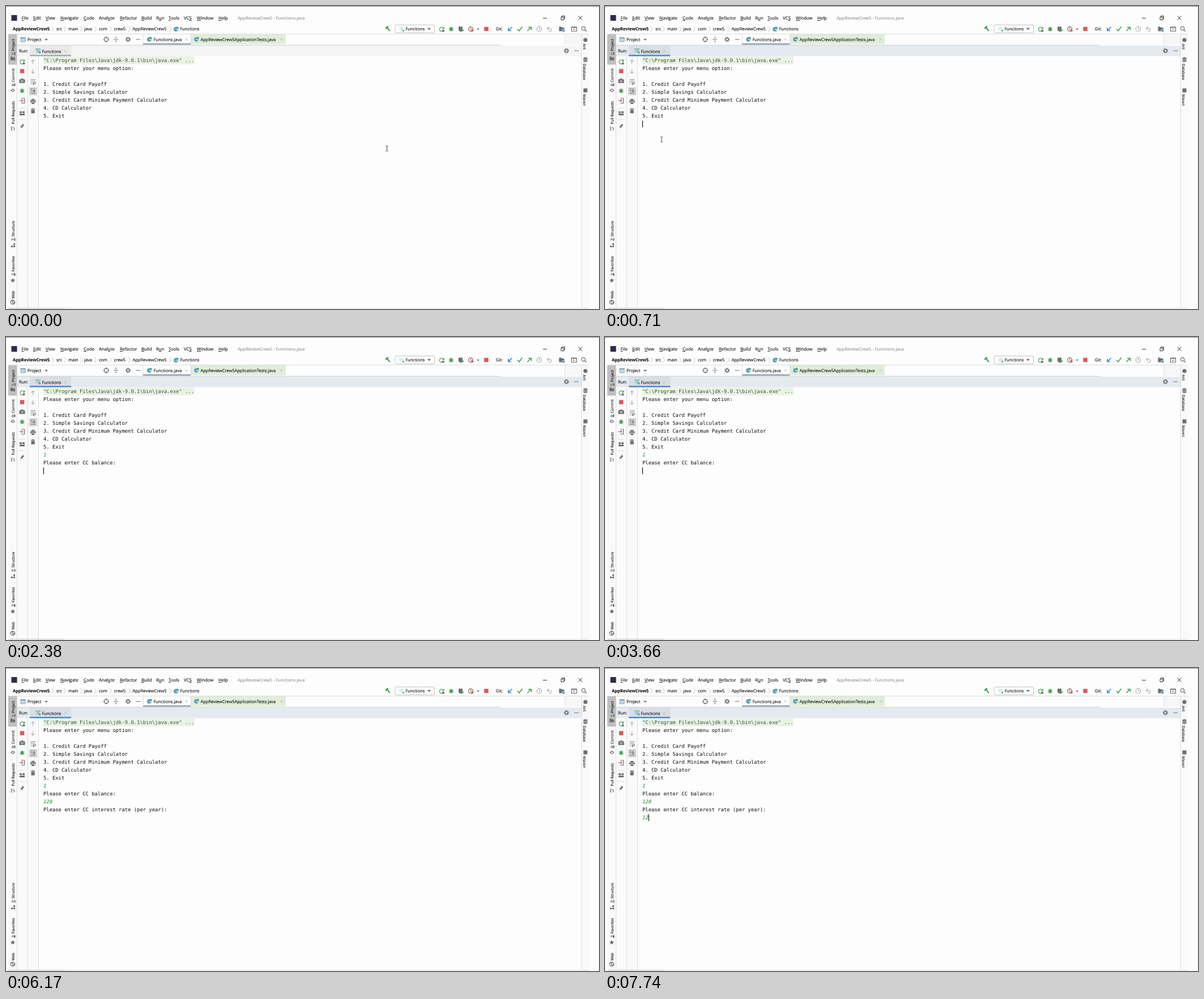
Recreate the animation shown at these times as an HTML page. Size 1047x535 px, loop 7990 ms.

```html
<!DOCTYPE html>
<html lang="en">
<head>
<meta charset="utf-8">
<title>Console run</title>
<style>
html, body { margin: 0; width: 100%; height: 100%; overflow: hidden; background: #fdfdfd; }
svg { display: block; width: 1047px; height: 535px; }
text { font-family: "Open Sans", "Noto Sans", sans-serif; font-size: 7.5px; fill: #111; stroke: #111; stroke-width: .12; text-rendering: geometricPrecision; }
.menu text { font-size: 7.8px; }
.menu .title { font-size: 7.65px; fill: #7d7d7d; stroke: none; }
.side text { font-size: 6.5px; }
.console text { font-family: "DejaVu Sans Mono", "Noto Sans Mono", monospace; font-size: 8.85px; fill: #0c0c0c; stroke: none; white-space: pre; }
.console .cmd { fill: #414d41; }
.console .in { fill: #1f8a2a; font-style: italic; }
.header .bar { fill: #f5f5f5; }
.header .tab { fill: #e9e9e9; }
.header .mark { fill: #9ca7b8; }
.header.focus .bar { fill: #e5e9f0; }
.header.focus .tab { fill: #d9dee5; }
.header.focus .mark { fill: #4083c9; }
.line { fill: none; stroke: #6e6e6e; stroke-width: 1.2; }
.dim { stroke: #b4b4b4; }
.green { stroke: #4f9e5b; }
.gray { fill: #6e6e6e; }
</style>
</head>
<body>
<svg viewBox="0 0 1047 535" xmlns="http://www.w3.org/2000/svg">
  <defs>
    <g id="cls">
      <circle r="4.6" fill="#9fd0e8"/>
      <path d="M1.9-1.5A2.4 2.4 0 1 0 1.9 1.5" fill="none" stroke="#2f617c" stroke-width="1.1"/>
      <path d="M1.5-5l4 2.3-4 2.2z" fill="#4f9e5b"/>
    </g>
    <path id="chev" d="M-1.6-4.6L1.6 0-1.6 4.6" fill="none" stroke="#b9b9b9" stroke-width=".8"/>
    <path id="drop" d="M-3.2-1.7h6.4L0 2z" fill="#6e6e6e"/>
    <path id="x" d="M-2-2l4 4M2-2l-4 4" fill="none" stroke="#b0b0b0" stroke-width=".8"/>
    <g id="gear" fill="none" stroke="#6e6e6e">
      <circle r="2.5" stroke-width="1.7"/>
      <circle r="3.9" stroke-width="1.4" stroke-dasharray="1.5 1.56"/>
    </g>
    <g id="bug" fill="#4f9e5b" stroke="#4f9e5b">
      <ellipse rx="2.5" ry="3.5" stroke="none"/>
      <path d="M-4-3l8 6M-4 3l8-6M-4.4 0h8.8M-1.5-4.5l1.5 1.5 1.5-1.5" fill="none" stroke-width=".9"/>
    </g>
    <g id="rerun">
      <path d="M3.6-1.5A3.8 3.8 0 1 0 3 2.8" class="line green" stroke-width="1.5"/>
      <path d="M4.8-4.4v4H.8z" fill="#4f9e5b"/>
      <rect x="1.2" y="1" width="3.6" height="3.6" fill="#6e6e6e"/>
    </g>
    <g id="conf">
      <rect x="-4.5" y="-4" width="9" height="7" fill="#b9dbe9"/>
      <path d="M-4.5-3.6h9" stroke="#8494a0" stroke-width="1.2"/>
      <path d="M-2.5-1h5M-2.5 1h5" stroke="#6793a8" stroke-width=".7"/>
    </g>
    <rect id="stop" x="-3.7" y="-3.7" width="7.4" height="7.4" fill="#db5860"/>
  </defs>

  <rect width="1047" height="535" fill="#fdfdfd"/>
  <path d="M0 .6H1047" stroke="#9c9c9c" stroke-width="1.2"/>

  <!-- panels -->
  <rect x="4" y="50" width="53" height="483" fill="#fafafa"/>
  <rect x="987" y="50" width="43" height="18" fill="#f7f7f7"/>
  <rect x="1016" y="68" width="14" height="465" fill="#fafafa"/>
  <rect x="327" y="50" width="167" height="17.5" fill="#e0edda"/>
  <g class="header" id="header">
    <rect class="bar" x="19" y="70" width="997" height="18.5"/>
    <rect class="tab" x="42" y="70" width="73" height="17"/>
    <rect class="mark" x="42" y="86.3" width="73" height="2.3"/>
  </g>
  <rect x="4" y="50" width="15" height="53.5" fill="#bfbfbf"/>
  <rect x="41" y="143.5" width="14" height="14" fill="#d3d3d3"/>
  <g fill="none" stroke="#d5d5d5" stroke-width=".8">
    <path d="M4 49.5H1030M19.4 50V533M38.4 89V533M57.4 89V533M1016.4 50V533M242 50v18M326.5 50v18M987 50v18M4 533.6H1030"/>
    <path d="M19 69.3H873" stroke="#bcc2ca"/>
    <path d="M4 533.6H103" stroke="#bdbdbd"/>
    <path d="M23 180.5h11M23 200.5h11"/>
  </g>
  <rect x="242" y="66" width="84" height="2.3" fill="#8c9cae"/>

  <!-- title row -->
  <rect x="9.5" y="16" width="10" height="10" fill="#302b46"/>
  <g fill="none" stroke="#222" stroke-width=".9">
    <path d="M948 21.500h7M1010.500 17.500l7 7M1017.500 17.500l-7 7"/>
    <path d="M980 19.500h5v5h-5zM981.500 19.500v-2h5v5h-1.500"/>
  </g>
  <g class="menu" id="menu"></g>

  <!-- navigation row -->
  <g id="crumbs"></g>
  <use href="#cls" x="300" y="41"/>
  <path d="M669.5 38.500l4-3.500 2 1.500-1 1.500 4 5.500-1.500 1.300-4.500-5.300-2 1.500z" fill="#4f9e5b"/>
  <rect x="687" y="33.5" width="69.5" height="14" rx="1.5" fill="#fff" stroke="#bcbcbc" stroke-width=".9"/>
  <use href="#conf" transform="translate(698 40.500) scale(.85)" opacity=".35"/>
  <circle cx="701.5" cy="43.5" r="1.6" fill="#4fae4f"/>
  <use href="#drop" x="747" y="40.5"/>
  <use href="#rerun" x="769" y="41"/>
  <use href="#bug" x="786" y="41"/>
  <path d="M799 36.500h7v4.500q0 3-3.500 4.300-3.500-1.300-3.500-4.300z" class="gray"/>
  <path d="M803.500 39.500l5.500 3.300-5.500 3.300z" fill="#4f9e5b"/>
  <circle cx="820.5" cy="40.5" r="3.9" class="line"/>
  <path d="M820.500 38v3h2" class="line" style="stroke:#db5860"/>
  <path d="M822 40.500l4.500 2.700-4.500 2.700z" fill="#db5860"/>
  <use href="#drop" transform="translate(833.5 41) scale(.75)"/>
  <use href="#stop" x="848" y="40.5"/>
  <g fill="none" stroke-width="1.7">
    <path d="M893.500 37l-6 6M887 38.500v5h5" stroke="#3b8ad0"/>
    <path d="M903 40.500l3 3.500 5.500-7.500" stroke="#4f9e5b"/>
    <path d="M920.500 44l6-6M922 37.500h5.500v5" stroke="#4f9e5b"/>
  </g>
  <g class="line dim">
    <circle cx="941.5" cy="40.5" r="4.3"/>
    <path d="M941.500 37.500v3.200h2.500M956 39.500h4.500a2.500 2.500 0 0 1 0 5h-2.500M958.500 36.500l-3 3 3 3"/>
  </g>
  <path d="M976.500 36.500h3.500l1.200 1.500h4.300v6.500h-9z" class="gray"/>
  <path d="M982 41.500h4.500v4H982z" fill="#4d8fc4" stroke="#fdfdfd" stroke-width=".6"/>
  <path d="M998.500 37h9v7.500h-9zM998.500 38h9" class="line"/>
  <path d="M1001.800 39.800l2.800 1.500-2.800 1.500z" class="gray"/>
  <circle cx="1019.5" cy="39.5" r="3.2" class="line"/>
  <path d="M1022 42l3 3" class="line"/>

  <!-- tab rows -->
  <path d="M26 56h8v7h-8z" fill="#b9dbe9" stroke="#8494a0" stroke-width=".8"/>
  <path d="M25.600 56.300h8.800" stroke="#7e8a92" stroke-width="1.5"/>
  <use href="#drop" transform="translate(71 59.500) scale(.9)"/>
  <g class="line">
    <circle cx="177" cy="59" r="3.9"/>
    <path d="M177 54v3.500M177 60.500V64M172 59h3.500M178.500 59h3.500M190 59h8M194 54v3.200M194 60.800V64M229.500 59h8M1003 79h8"/>
  </g>
  <use href="#gear" x="215.5" y="59"/>
  <use href="#gear" x="989.5" y="79"/>
  <use href="#cls" x="253" y="59"/>
  <use href="#cls" x="336" y="59"/>
  <use href="#x" x="318.5" y="59"/>
  <use href="#x" x="486.5" y="59"/>
  <use href="#conf" x="56.5" y="79.5"/>
  <circle cx="59.5" cy="82" r="1.8" fill="#4fae4f"/>
  <use href="#x" x="104.5" y="80"/>
  <g id="labels"></g>

  <!-- run tools -->
  <use href="#rerun" x="28.5" y="98.5"/>
  <use href="#stop" x="28.5" y="115"/>
  <path d="M23.500 129.500h2.500l1-1.500h3l1 1.500h2.500v6.500h-10z" class="gray"/>
  <circle cx="28.5" cy="132.6" r="1.7" fill="#6e6e6e" stroke="#fdfdfd" stroke-width=".9"/>
  <use href="#bug" x="28.5" y="150"/>
  <path d="M27 163h5.500v8.500H27" class="line"/>
  <path d="M23.500 167.200h6M27.500 165l2.200 2.200-2.200 2.200" class="line" style="stroke:#db5860"/>
  <path d="M24 186h4v3h-4zM29 186h4v3h-4zM24 190h9v3h-9z" class="gray"/>
  <path d="M29 207.500l3.500 3.500-1.500.5-2 2 .2 2-1.700-1.200-2.800 2.700 2-3.500-1.700-1.500 2-.3 1.800-2z" class="gray"/>
  <g class="line dim">
    <path d="M47.500 102.500v-7.500M44.500 98l3-3 3 3M47.500 111.500v7.500M44.500 116l3 3 3-3"/>
  </g>
  <path d="M43.500 130.500h8.500M43.500 134h7a1.700 1.700 0 0 1 0 3.500h-2.500M43.500 137.500h2M49.500 135.700l-1.800 1.800 1.800 1.800" class="line"/>
  <path d="M43.500 146.500h3.500M43.500 149.500h3.500M43.500 154h8.500M49.500 145.500v6M47.500 149.500l2 2 2-2" class="line"/>
  <path d="M45 164h5.500v2H45zM43 166.500h9.500v4H51V169h-6.500v1.500H43zM45.200 170h5v3h-5z" class="gray"/>
  <path d="M43.800 181.500h2.500v-1h2.500v1h2.500v1.200h-7.500zM44.500 183.500h6.200v6h-6.200z" class="gray"/>

  <!-- tool window bars -->
  <g class="side" id="side"></g>
  <path d="M8 89.500h3l1 1.200h4v5H8z" class="gray"/>
  <circle cx="12" cy="149" r="2.2" class="line"/>
  <path d="M8 149h1.800M14.200 149H16" class="line"/>
  <path d="M10 213.500v6M14.500 219.500v-4.500h-2M8.500 214h3M8.500 219h3" class="line"/>
  <path d="M9 423h3v3H9zM13 423h3v3h-3zM13 419h3v3h-3z" class="gray"/>
  <path d="M12 480.200l1.200 2.700 3 .3-2.200 2 .6 3-2.600-1.600-2.600 1.600.6-3-2.200-2 3-.3z" class="gray"/>
  <circle cx="12" cy="523" r="3.7" class="line"/>
  <path d="M8.500 522l3-2 1 2.500-1.500 3M13 525.500l2.500-3" class="line"/>
  <circle cx="1023" cy="60" r="3.6" class="gray"/>
  <path d="M1019.500 91.500q3.500-2 7 0v6.500q-3.500 2-7 0z" class="gray"/>
  <path d="M1019.500 93.500q3.500 1.500 7 0M1019.500 96q3.500 1.500 7 0" stroke="#fdfdfd" stroke-width=".6" fill="none"/>
  <rect x="1019.5" y="145.5" width="7" height="7" class="gray"/>

  <!-- console -->
  <rect x="65.5" y="89" width="267" height="14" fill="#e9f3e4"/>
  <g class="console" id="console"></g>
  <rect id="caret" width="1.2" height="11.8" fill="#111"/>
  <path id="beam" d="M-2-4.500h1.500L0-4 .5-4.500H2M0-4V4M-2 4.500h1.500L0 4l.5.5H2" fill="none" stroke="#333" stroke-width=".9"/>
</svg>
<script>
const LOOP = 7990, LEFT = 66, CHAR = 5.328, ROW = 14.04, CLICK = 710;
const $ = id => document.getElementById(id);
const project = "AppReviewCrew5";

function label(parent, x, y, str, attrs = {}) {
  const el = document.createElementNS("http://www.w3.org/2000/svg", "text");
  for (const [k, v] of Object.entries({ x, y, ...attrs })) el.setAttribute(k, v);
  el.textContent = str;
  $(parent).append(el);
  return el;
}

// underline the shortcut letter at index i
function mnemonic(el, i) {
  const s = el.textContent;
  el.innerHTML = s.slice(0, i) + '<tspan text-decoration="underline">' + s[i] + "</tspan>" + s.slice(i + 1);
}

[["File", 27.5, 0], ["Edit", 48, 0], ["View", 70, 0], ["Navigate", 96, 0], ["Code", 137, 0],
 ["Analyze", 164, 4], ["Refactor", 201, 0], ["Build", 239, 0], ["Run", 265, 1], ["Tools", 287, 0],
 ["VCS", 314, 2], ["Window", 337, 0], ["Help", 375, 0]
].forEach(([s, x, i]) => mnemonic(label("menu", x, 24, s), i));
label("menu", 409, 24, project + " - Functions.java", { class: "title" });

label("crumbs", 12, 43.3, project, { "font-weight": 700, style: "font-size:7.6px" });
[["src", 89], ["main", 110], ["java", 138], ["com", 164], ["crew5", 190.5], [project, 223.5], ["Functions", 307.5]]
  .forEach(([s, x]) => label("crumbs", x, 43.3, s));
$("crumbs").innerHTML += [82.5, 104, 133, 158, 184.5, 218, 290]
  .map(x => `<use href="#chev" x="${x}" y="40.5"/>`).join("");

[["Functions", 705.5, 43.3], ["Git:", 865, 43.3], ["Project", 38, 62], ["Functions.java", 260.5, 62],
 [project + "ApplicationTests.java", 343.5, 62], ["Run:", 23, 82.3], ["Functions", 63.5, 82.5]
].forEach(([s, x, y]) => label("labels", x, y, s));

const turned = (s, x, y, a) => label("side", 0, 0, s, { transform: `translate(${x} ${y}) rotate(${a})` });
[["1: Project", 86.5], ["0: Commit", 141.5], ["7: Structure", 414.5], ["2: Favorites", 476]]
  .forEach(([s, y]) => mnemonic(turned(s, 14.6, y, -90), 0));
turned("Pull Requests", 14.6, 208.5, -90);
turned("Web", 14.6, 516.5, -90);
[["Ant", 66.5], ["Database", 102], ["Maven", 156]].forEach(([s, y]) => turned(s, 1019.3, y, 90));

// console rows: text, class, time of appearance
const rows = [
  ['"C:\\Program Files\\Java\\jdk-9.0.1\\bin\\java.exe" ...', "cmd", 0],
  ["Please enter your menu option:", "", 0],
  ["", "", 0],
  ["1. Credit Card Payoff", "", 0],
  ["2. Simple Savings Calculator", "", 0],
  ["3. Credit Card Minimum Payment Calculator", "", 0],
  ["4. CD Calculator", "", 0],
  ["5. Exit", "", 0],
  ["1", "in", 2110],
  ["Please enter CC balance:", "", 2230],
  ["120", "in", 4520],
  ["Please enter CC interest rate (per year):", "", 5340],
  ["12", "in", 7740]
].map(([str, cls, at], i) => ({ at, el: label("console", LEFT, 98.6 + ROW * i, str, { class: cls }) }));

// time, row, column; no row means hidden
const carets = [
  [0], [CLICK, 8, 0], [1160], [1590, 8, 0], [2110, 8, 1], [2230], [2380, 10, 0], [3070], [3660, 10, 0],
  [4080], [4520, 10, 2], [4660, 10, 3], [5060], [5210, 11, 0], [5340], [5470, 12, 0], [6170],
  [6600, 12, 0], [7160], [7590, 12, 0], [7740, 12, 2]
];
// time, x, y of the pointer
const beams = [[0, 672.5, 251.5], [150, 426, 277.5], [300, 165.5, 274], [450, 103.5, 239], [590, 100, 235.5], [1010]];

const current = (list, t) => list.filter(s => s[0] <= t).pop();

function place(el, x, y) {
  const shown = x !== undefined;
  el.setAttribute("visibility", shown ? "visible" : "hidden");
  if (shown) el.setAttribute("transform", `translate(${x} ${y})`);
}

function draw(t) {
  $("header").classList.toggle("focus", t >= CLICK);
  for (const r of rows) r.el.setAttribute("visibility", t >= r.at ? "visible" : "hidden");
  rows[10].el.textContent = t < 4660 ? "12" : "120";
  const [, row, col] = current(carets, t);
  place($("caret"), row && LEFT - 0.2 + col * CHAR, 90 + ROW * row);
  const [, x, y] = current(beams, t);
  place($("beam"), x, y);
}

function tick() {
  draw(performance.now() % LOOP);
  requestAnimationFrame(tick);
}
tick();
</script>
</body>
</html>
```
